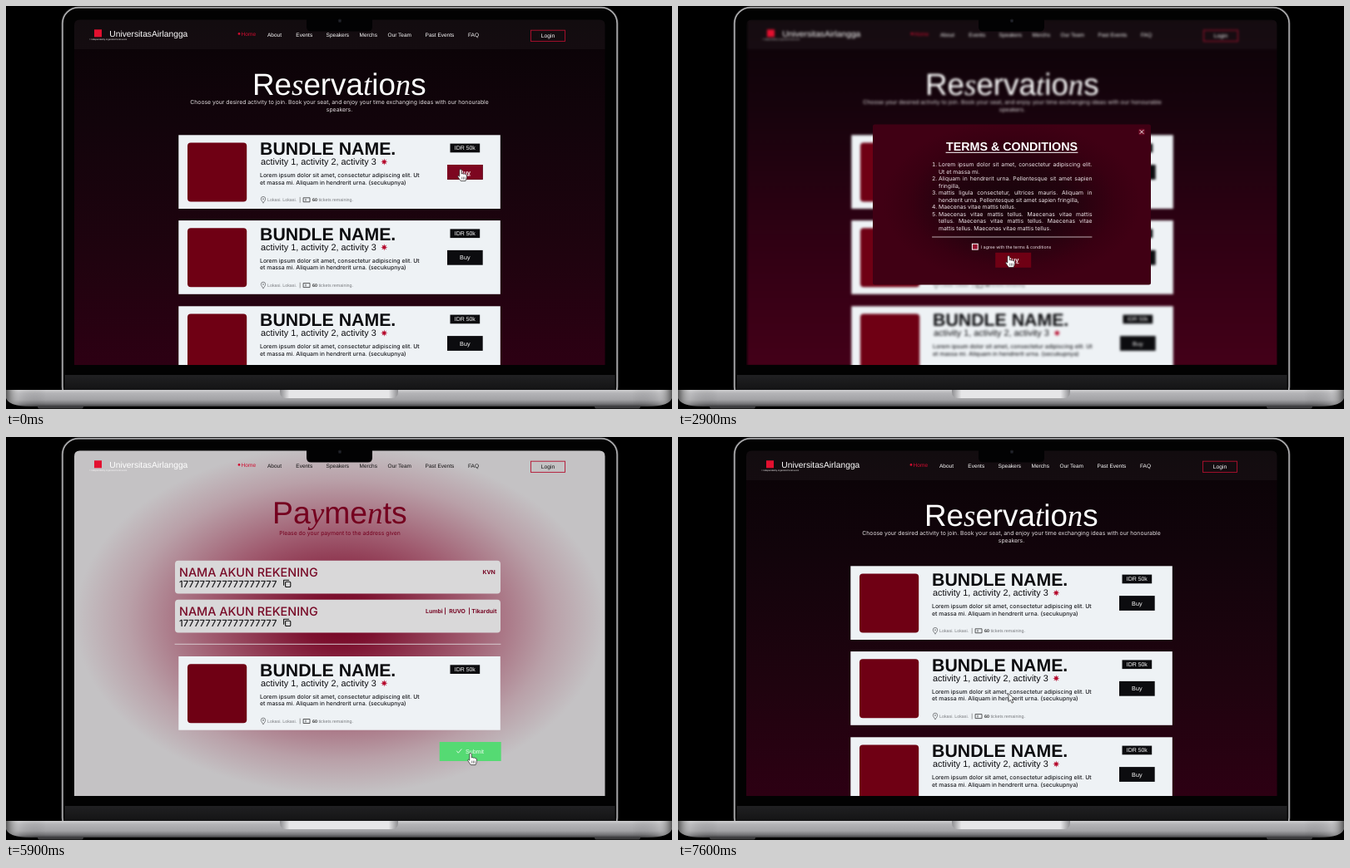
These frames come from a looping animation (800x485 px, 7700 ms). An HTML page:

```html
<!DOCTYPE html>
<html lang="en">
<head>
<meta charset="utf-8">
<title>Ticket reservation walkthrough</title>
<style>
  html, body { margin: 0; width: 100%; height: 100%; overflow: hidden; background: #000; }
  svg { display: block; width: 800px; height: 485px; }
  text { font-family: "Liberation Sans", Arial, sans-serif; text-rendering: geometricPrecision; white-space: pre; }
  .inter, ol { font-family: Inter, "Open Sans", sans-serif; }
  .serif { font-family: "Liberation Serif", Times, serif; font-style: italic; }
  .mid { text-anchor: middle; }
  .end { text-anchor: end; }
  .bold { font-weight: 700; }
  .medium { font-weight: 500; }
  .under { text-decoration: underline; }
  ol { margin: 0; padding: 0 0 0 13px; width: 184.5px; font-size: 6.8px; line-height: 8.5px;
       color: #efe6e9; text-align: justify; text-rendering: geometricPrecision; }
</style>
</head>
<body>
<svg id="stage" viewBox="0 0 800 485"></svg>
<script>
const LOOP = 7700;
const RED = '#6f0014', INK = '#0c0c0f', PAPER = '#eef2f5', WINE = '#780a27';

const text = (x, y, size, content, fill = '#fff', cls = '') =>
  `<text x="${x}" y="${y}" font-size="${size}" fill="${fill}" class="${cls}">${content}</text>`;
const rect = (x, y, w, h, fill, extra = '') =>
  `<rect x="${x}" y="${y}" width="${w}" height="${h}" fill="${fill}" ${extra}/>`;
const line = (d, stroke, width = 1) =>
  `<path d="${d}" fill="none" stroke="${stroke}" stroke-width="${width}" stroke-linecap="round" stroke-linejoin="round"/>`;
const group = (id, content) => `<g id="${id}">${content}</g>`;

// Letters in square brackets are set in italic serif.
const headline = (x, y, size, words, fill) =>
  text(x, y, size, words.replace(/\[(.)\]/g, '<tspan class="serif">$1</tspan>'), fill);

const stopList = stops =>
  stops.map(([at, color]) => `<stop offset="${at}" stop-color="${color}"/>`).join('');
const gradient = (id, stops, extra = 'x2="0" y2="1"') =>
  `<linearGradient id="${id}" ${extra}>${stopList(stops)}</linearGradient>`;
const radial = (id, stops, cx, cy, rx, ry) =>
  `<radialGradient id="${id}" gradientUnits="userSpaceOnUse" cx="0" cy="0" r="1"
    gradientTransform="translate(${cx} ${cy}) scale(${rx} ${ry})">${stopList(stops)}</radialGradient>`;

function star(cx, cy, radius) {
  const points = Array.from({ length: 16 }, (_, i) => {
    const r = i % 2 ? radius * 0.42 : radius, a = i * Math.PI / 8;
    return `${(cx + r * Math.sin(a)).toFixed(2)},${(cy - r * Math.cos(a)).toFixed(2)}`;
  });
  return `<polygon points="${points.join(' ')}" fill="#b5092c"/>`;
}

function navBar(ink) {
  const links = [['About', 314], ['Events', 348.3], ['Speakers', 384.6], ['Merchs', 424.6],
    ['Our Team', 458.6], ['Past Events', 503.6], ['FAQ', 555]];
  return rect(106, 28.3, 9, 9, '#e3102f')
    + text(124.3, 37.2, 10.25, 'UniversitasAirlangga')
    + text(100, 40.8, 2.7, '= independently organized local event')
    + '<circle cx="280" cy="33.4" r="1.4" fill="#d00d30"/>'
    + text(282.5, 36.4, 6.6, 'Home', '#d00d30')
    + links.map(([label, x]) => text(x, 36.5, 6.5, label, ink)).join('')
    + rect(630.5, 29.2, 41, 13.2, 'none', 'stroke="#b3102f" stroke-width=".9"')
    + text(651, 38.1, 6.7, 'Login', ink, 'mid');
}

function bundleCard(y) {
  const pin = line('M309 81.5 C307 79 306.3 78 306.3 76.8 A2.7 2.7 0 0 1 311.7 76.8 C311.7 78 311 79 309 81.5Z', '#55575a', .7)
    + '<circle cx="309" cy="76.9" r=".8" fill="#55575a"/>';
  const ticket = line('M357.5 75.5 H365 V80.5 H357.5Z M360 77 V79', '#333', .8);
  return `<g transform="translate(0 ${y})">`
    + rect(207.3, 0, 386.5, 88.7, PAPER)
    + rect(218, 9.2, 71.2, 71, RED, 'rx="4"')
    + text(305, 24, 21.3, 'BUNDLE NAME.', INK, 'bold')
    + text(306, 35.6, 10.87, 'activity 1, activity 2, activity 3', INK)
    + star(454.3, 32.3, 4.2)
    + text(305, 51.2, 6.92, 'Lorem ipsum dolor sit amet, consectetur adipiscing elit. Ut', '#1b1c20', 'inter medium')
    + text(305, 59.3, 6.92, 'et massa mi. Aliquam in hendrerit urna. (secukupnya)', '#1b1c20', 'inter medium')
    + pin + text(314, 80.2, 5.3, 'Lokasi. Lokasi.', '#77797d')
    + line('M353.2 75 V81', '#777', .7) + ticket
    + text(368, 80.2, 5.35, '<tspan class="bold" fill="#333">60</tspan> tickets remaining.', '#77797d')
    + rect(533.5, 10.3, 35.7, 10.7, INK)
    + text(551.3, 18.2, 6.95, 'IDR 50k', '#fff', 'mid')
    + '</g>';
}

const buyButton = y => rect(530, y, 42.7, 17.8, INK) + text(551.3, y + 11.5, 7.2, 'Buy', '#fff', 'mid');

function reservations() {
  const tops = [155.3, 258.1, 361.3];
  return rect(82, 16, 638, 417, 'url(#night)') + rect(82, 16, 638, 36, '#fff', 'opacity=".035"')
    + navBar('#fff')
    + headline(296, 106.8, 36.8, 'Re[s]erva[t]io[n]s', '#fff')
    + text(400.5, 118.2, 6.83, 'Choose your desired activity to join. Book your seat, and enjoy your time exchanging ideas with our honourable', '#e4dfe1', 'inter mid')
    + text(400.5, 126.8, 6.83, 'speakers.', '#e4dfe1', 'inter mid')
    + tops.map(y => bundleCard(y) + buyButton(y + 35.8)).join('')
    + group('cardHover', rect(530, 191, 42.7, 17.8, '#7d0620') + text(551.3, 202.6, 7.2, 'Buy', '#fff', 'mid bold under'));
}

function termsDialog() {
  const terms = ['Lorem ipsum dolor sit amet, consectetur adipiscing elit. Ut et massa mi.',
    'Aliquam in hendrerit urna. Pellentesque sit amet sapien fringilla,',
    'mattis ligula consectetur, ultrices mauris. Aliquam in hendrerit urna. Pellentesque sit amet sapien fringilla,',
    'Maecenas vitae mattis tellus.',
    Array(5).fill('Maecenas vitae mattis tellus.').join(' ')];
  return rect(234, 142.6, 334, 193, 'url(#dialogFill)', 'rx="2.5"')
    + rect(553.3, 147.8, 7.5, 7.5, '#6b0a24', 'rx="1.5"')
    + line('M555 149.5 L559 153.5 M559 149.5 L555 153.5', '#fff', .9)
    + text(401, 174, 14.3, 'TERMS &amp; CONDITIONS', '#fff', 'mid bold')
    + line('M322 176.3 H480', '#fff', 1)
    + `<foreignObject x="300" y="187.3" width="210" height="90"><ol>${terms.map(t => `<li>${t}</li>`).join('')}</ol></foreignObject>`
    + line('M305.5 278 H497', '#cdbfc4', .9)
    + rect(353.4, 286.3, 6.8, 6.8, 'none', 'id="checkbox" stroke="#fff" stroke-width="1"')
    + group('agree', text(364, 291.7, 5.15, 'I agree with the terms &amp; conditions', 'inherit', 'inter'))
    + group('buyOff', rect(381.2, 296.8, 43, 18, '#48474b') + text(402.5, 308.4, 7.4, 'Buy', '#aaa9ad', 'mid'))
    + group('buyOn', rect(381.2, 296.8, 43, 18, RED))
    + group('buyLabel', text(402.5, 308.4, 7.4, 'Buy', '#fff', 'mid'))
    + group('buyHover', text(402.5, 308.4, 7.4, 'Buy', '#fff', 'mid bold under'));
}

function account(y, methods) {
  return rect(203, y, 391, 39.7, '#d9d8d9', 'rx="4"')
    + text(208, y + 19.2, 14.4, 'NAMA AKUN REKENING', WINE, 'inter medium')
    + text(208, y + 32, 11.25, '1' + '7'.repeat(17), '#17171a', 'inter medium')
    + rect(335.6, y + 25.6, 6.2, 6.2, 'none', 'rx="1" stroke="#111" stroke-width="1.1"')
    + line(`M333.6 ${y + 29.6} V${y + 23.6} H339.6`, '#111', 1.1)
    + text(589.5, y + 16.2, 6.9, methods, WINE, 'inter bold end');
}

function payments() {
  return rect(82, 16, 638, 417, 'url(#glow)') + navBar('#111')
    + headline(320, 104, 37.3, 'Pa[y]me[n]ts', '#75001f')
    + text(401, 118.3, 6.83, 'Please do your payment to the address given', '#75001f', 'inter mid')
    + account(148.7, 'KVN&#160;')
    + account(195.7, 'Lumbi |&#160; RUVO &#160;| Tikarduit')
    + line('M203 249.3 H594', '#d6c8ce', 1)
    + bundleCard(264)
    + group('proof', rect(520.7, 367, 74, 23, INK)
      + line('M525.2 379.5 V382.3 H531.6 V379.5 M528.4 380 V375.3 M526.2 377.3 L528.4 375.1 L530.6 377.3', '#fff', 1)
      + text(535, 381.6, 7.2, 'Proof of Payment'))
    + group('submit', rect(520.7, 367, 74, 23, '#55da73')
      + line('M541.5 378 L543.3 380.2 L547 375.8', '#e9fbed', .9)
      + text(552, 380.6, 7.1, 'Submit', '#effcf2'));
}

function thankYou() {
  return rect(82, 16, 638, 417, 'url(#glow)') + navBar('#111')
    + headline(313, 265, 37.4, 'Th[a]n[k] Yo[u]!', '#fff')
    + text(406, 278.4, 6.83, 'We have received your proof of payment. After checking the validity, your ticket will be sent to your email.', '#f4eaed', 'inter mid')
    + text(406, 287, 6.83, 'Contact Person: <tspan class="bold">NAMA</tspan> <tspan class="under">kontak.example/000000</tspan>', '#f4eaed', 'inter mid')
    + rect(376.5, 301, 48.5, 20, '#6d0018')
    + text(401, 314.6, 10, 'Back', '#fff', 'mid bold');
}

function lid() {
  const frame = (stroke, width) =>
    rect(68, 2, 666, 475, '#020202', `rx="19" stroke="${stroke}" stroke-width="${width}"`);
  return frame('#4c4c4e', 3) + frame('#b4b4b6', 1.5) + rect(70.5, 444, 661, 18, 'url(#chin)');
}

function base() {
  const feet = [38, 707].map(x => rect(x, 480, 55, 4.6, '#3c3c3e', 'rx="3"')).join('');
  const body = fill => `<path d="M0 462 H800 V470 Q799 482 770 482 H30 Q1 482 0 470Z" fill="${fill}"/>`;
  return feet + body('url(#base)') + body('url(#baseSides)')
    + '<path d="M329 462 H471 V464 Q471 472 463 472 H337 Q329 472 329 464Z" fill="url(#lip)"/>';
}

const arrow = '<path d="M0 0 V10 L2.3 7.9 L4 11.7 L5.8 10.9 L4.2 7.2 H7.2Z" fill="#fff" stroke="#222" stroke-width=".7"/>';
const hand = `<path d="M-1.2 .8 Q-1.2 -.5 0 -.5 T1.3 .8 V5 Q2.6 4.2 3.4 5.2 Q4.8 4.5 5.6 5.7 Q7.4 5.3 7.4 7
  V9.5 Q7.2 11.5 6 13.6 H.3 Q-1.4 11.4 -3.2 8.6 Q-3.6 7.2 -2.4 7.2 L-1.2 8.2Z" fill="#fff" stroke="#222" stroke-width=".7"/>`
  + line('M1.7 9 V11.3 M3.5 9 V11.3 M5.2 9 V11.3', '#333', .6);

const stage = document.getElementById('stage');
stage.innerHTML = `<defs>
    ${gradient('night', [[0, '#090306'], [.3, '#12040b'], [.7, '#20030f'], [1, '#2d0013']])}
    ${gradient('nightLit', [[0, '#0b0307'], [.25, '#16030c'], [.65, '#300013'], [1, '#430018']])}
    ${gradient('chin', [[0, '#202022'], [1, '#141415']])}
    ${gradient('base', [[0, '#cfcfd1'], [.2, '#b4b4b7'], [.6, '#a2a2a5'], [.85, '#727275'], [1, '#39393b']])}
    ${gradient('baseSides', [[0, '#555'], [.02, '#ddd3'], [.06, '#0000'], [.94, '#0000'], [.98, '#ddd3'], [1, '#555']], '')}
    ${gradient('lip', [[0, '#8e8e91'], [.08, '#e6e6e8'], [.92, '#e6e6e8'], [1, '#8e8e91']], '')}
    ${radial('glow', [[0, '#75001f'], [.15, '#7d1230'], [.5, '#a05c70'], [.8, '#b9a0a8'], [1, '#c4c2c4']], 401, 220, 318, 210)}
    ${radial('dialogFill', [[0, '#18040b'], [.45, '#22030e'], [.8, '#390012'], [1, '#400014']], 401, 236, 155, 98)}
    <filter id="soft" filterUnits="userSpaceOnUse" x="72" y="6" width="658" height="437" color-interpolation-filters="sRGB">
      <feGaussianBlur stdDeviation="1.4"/><feOffset dx=".7"/>
    </filter>
    <clipPath id="screen"><path d="M82 432 V23 Q82 16.5 88.5 16.5 H713 Q719.5 16.5 719.5 23 V432Z"/></clipPath>
  </defs>`
  + rect(0, 0, 800, 485, '#000')
  + lid()
  + '<g clip-path="url(#screen)">'
  + group('home', reservations()) + group('dialog', termsDialog())
  + group('pay', payments()) + group('thanks', thankYou())
  + '</g>'
  + '<path d="M361 16 H440 V25 Q440 30.5 434.5 30.5 H366.5 Q361 30.5 361 25Z" fill="#020203"/>'
  + '<circle cx="401" cy="17.8" r="2.2" fill="#17181c"/><circle cx="401" cy="17.8" r=".9" fill="#2a2d38"/>'
  + base()
  + group('cursor', group('arrow', arrow) + group('hand', hand));

const el = id => document.getElementById(id);
const show = (id, on) => el(id).setAttribute('display', on ? 'inline' : 'none');
const nightRect = el('home').firstElementChild;

// Key moments of the walkthrough, in ms.
const OPEN = 500, LEAVE = 1150, TICK = 2000, PAY = 3400, UPLOAD = 5300, DONE = 6200, BACK = 7500;
const path = [[0, 546, 197], [LEAVE, 545.6, 197], [1750, 356, 288.5], [2200, 356, 288.5],
  [2600, 397, 301], [4100, 397, 300.5], [4700, 558, 381], [6500, 558, 381], [7050, 397, 308.5], [LOOP, 397, 308.5]];

function cursorAt(t) {
  const i = path.findIndex(([at], k) => k && t < at);
  const [t0, x0, y0] = path[i - 1], [t1, x1, y1] = path[i];
  const u = (t - t0) / (t1 - t0), e = u * u * (3 - 2 * u);
  return [x0 + (x1 - x0) * e, y0 + (y1 - y0) * e];
}

function draw(t) {
  const dialog = t >= OPEN && t < PAY, ticked = t >= TICK;
  const onBuy = dialog && t >= 2500;
  show('home', t < PAY || t >= BACK);
  show('dialog', dialog);
  show('pay', t >= PAY && t < DONE);
  show('thanks', t >= DONE && t < BACK);

  el('home').setAttribute('filter', dialog ? 'url(#soft)' : 'none');
  nightRect.setAttribute('fill', dialog ? 'url(#nightLit)' : 'url(#night)');
  show('cardHover', t < LEAVE);

  el('checkbox').setAttribute('fill', ticked ? '#96102f' : 'none');
  el('agree').setAttribute('fill', ticked ? '#eee4e8' : '#a3949a');
  show('buyOff', !ticked);
  show('buyOn', ticked);
  show('buyLabel', ticked && !onBuy);
  show('buyHover', onBuy);
  show('proof', t < UPLOAD);
  show('submit', t >= UPLOAD);

  const [x, y] = cursorAt(t);
  el('cursor').setAttribute('transform', `translate(${x.toFixed(2)} ${y.toFixed(2)})`);
  const pointing = t < OPEN || (t >= 1700 && t < 2250) || onBuy
    || (t >= 4600 && t < DONE) || (t >= 7000 && t < BACK);
  show('hand', pointing);
  show('arrow', !pointing);
}

const start = performance.now();
function tick() {
  draw((performance.now() - start) % LOOP);
  requestAnimationFrame(tick);
}
draw(0);
requestAnimationFrame(tick);
</script>
</body>
</html>
```
